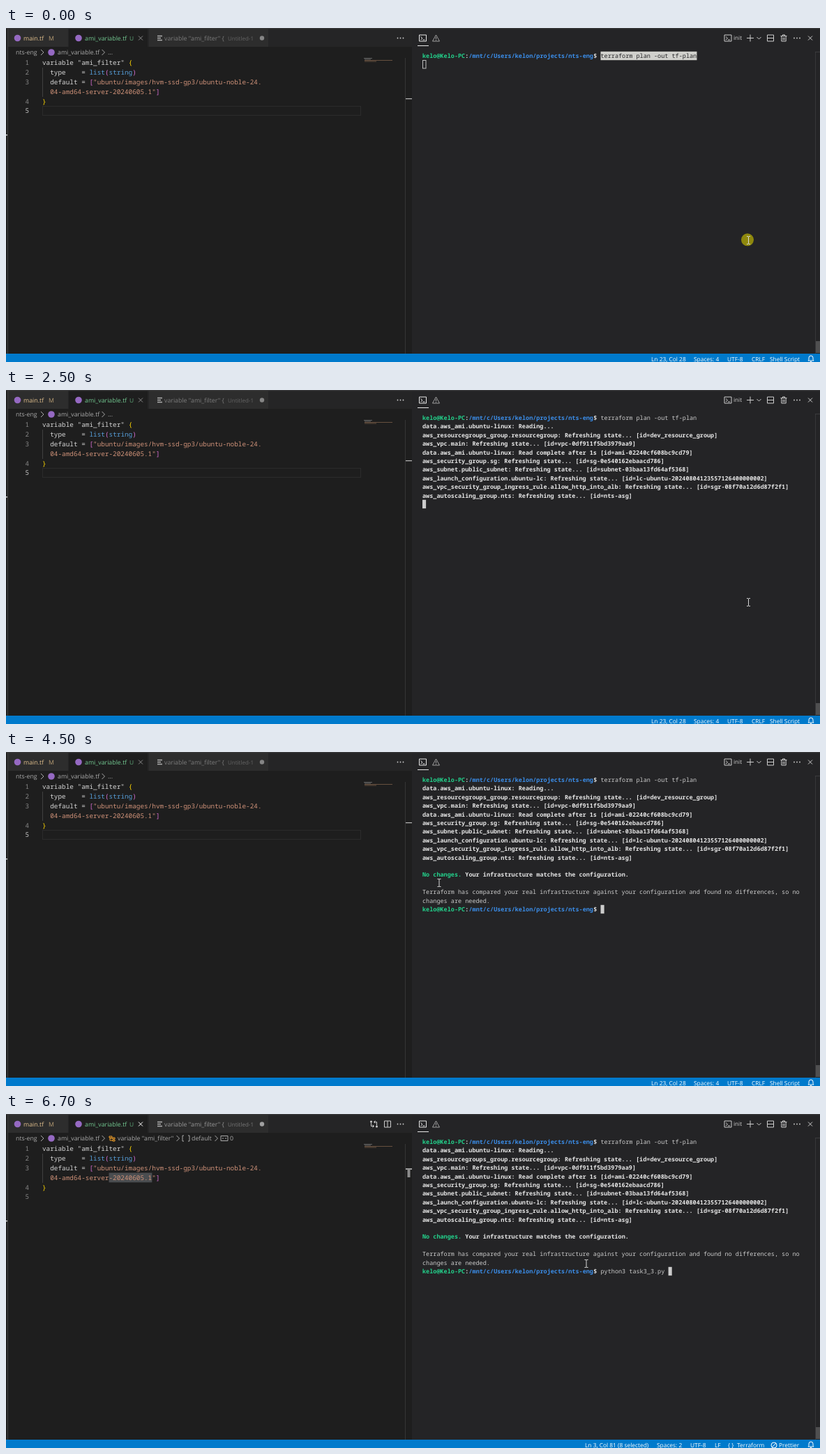
These frames come from a looping animation (1167 px wide and 480 px high, 8000 ms). An HTML page with a canvas:

```html
<!DOCTYPE html>
<html lang="en">
<head>
<meta charset="utf-8">
<title>Editor and terminal</title>
<style>
html, body { margin: 0; width: 100%; height: 100%; overflow: hidden; background: #1e1e1e; }
canvas { display: block; }
</style>
</head>
<body>
<canvas id="stage" width="1167" height="480"></canvas>
<script>
const ctx = document.getElementById('stage').getContext('2d');
const LOOP = 8000;
const WHITE = '#e5e5e5', GREY = '#cccccc', GREEN = '#23d18b', BLUE = '#3b8eea', DIM = '#a9a9a9';
const YELLOW = '#ffd700', PINK = '#da70d6', KEYWORD = '#569cd6', STRING = '#ce9178', PURPLE = '#9569c2';
const MONO = '"Noto Sans Mono", monospace';
const CODE = '9.367px ' + MONO, TERM = '8.517px ' + MONO, BOLD = 'bold ' + TERM;
const ui = size => size + 'px "Open Sans", sans-serif';
const COL = 5.11, ROW = 12.4, TERM_X = 597, TERM_Y = 33.8;
const CODE_COL = 5.62, CODE_X = 52;

const PROMPT = ['kelo@Kelo-PC', GREEN, ':', WHITE, '/mnt/c/Users/kelon/projects/nts-eng', BLUE, '$ ', WHITE];
const PROMPT_COLS = 50;
const PLAN = 'terraform plan -out tf-plan';
const TYPED = 'python3 task3_3.py ';
const OUTPUT = `data.aws_ami.ubuntu-linux: Reading...
aws_resourcegroups_group.resourcegroup: Refreshing state... [id=dev_resource_group]
aws_vpc.main: Refreshing state... [id=vpc-0df911f5bd3979aa9]
data.aws_ami.ubuntu-linux: Read complete after 1s [id=ami-02240cf608bc9cd79]
aws_security_group.sg: Refreshing state... [id=sg-0e540162ebaacd786]
aws_subnet.public_subnet: Refreshing state... [id=subnet-03baa13fd64af5368]
aws_launch_configuration.ubuntu-lc: Refreshing state... [id=lc-ubuntu-20240804123557126400000002]
aws_vpc_security_group_ingress_rule.allow_http_into_alb: Refreshing state... [id=sgr-08f70a12d6d87f2f1]
aws_autoscaling_group.nts: Refreshing state... [id=nts-asg]`.split('\n');
const SUMMARY = ['Terraform has compared your real infrastructure against your configuration and found no differences, so no',
  'changes are needed.'];

// Step tables: [time, values...]
const ROWS = [[0, 1], [2000, 5], [2500, 10], [3000, 15]];
const KEYS = [[0, 0], [5000, 1], [5500, 2], [6000, 3], [6050, 4], [6100, 6], [6150, 7],
  [6250, 8], [6300, 9], [6350, 12], [6400, 19]];
const MOUSE = [[0, 1064.5, 305, 1], [500, 1064.5, 305, 0], [3500, 601, 198, 1], [4000, 694, 215, 1],
  [4500, 621, 188, 0], [6450, 420, 140, 0], [6500, 210, 92, 1], [6550, 180, 92, 1],
  [6600, 148, 92, 1], [6650, 500, 150, 0], [6700, 832, 215, 0]];
const SELECTED = [[0, 0], [6550, 5], [6600, 11]];
const at = (table, t) => table.filter(step => step[0] <= t).pop().slice(1);

function box(x, y, w, h, color) {
  ctx.fillStyle = color;
  ctx.fillRect(x, y, w, h);
}
function frame(x, y, w, h, color) {
  ctx.strokeStyle = color;
  ctx.lineWidth = 1;
  ctx.strokeRect(x, y, w, h);
}
function disc(x, y, r, color) {
  ctx.fillStyle = color;
  ctx.beginPath();
  ctx.arc(x, y, r, 0, 7);
  ctx.fill();
}
function stroke(path, x, y, color, width = 1) {
  ctx.save();
  ctx.translate(x, y);
  ctx.strokeStyle = color;
  ctx.lineWidth = width;
  ctx.stroke(new Path2D(path));
  ctx.restore();
}
function text(str, x, y, color, font = ui(8.8)) {
  ctx.font = font;
  ctx.fillStyle = color;
  ctx.fillText(str, x, y);
}
// Alternating strings and colours on one monospaced line
function run(parts, x, y, font, advance) {
  for (let i = 0; i < parts.length; i += 2) {
    text(parts[i], x, y, parts[i + 1], font);
    x += parts[i].length * advance;
  }
}
const chevron = (x, y, color) => stroke('M-2 -4L2 0L-2 4', x, y, color);
const cross = (x, y, color) => stroke('M-3 -3L3 3M3 -3L-3 3', x, y, color);
const dots = (x, y) => [-4, 0, 4].forEach(d => disc(x + d, y, 0.9, GREY));
const prompt = (x, y, color) => stroke('M-5 -4.5H5V4.5H-5ZM-3 -2L-.5 .3L-3 2.5M0 2.5H3', x, y, color);

function drawTabs(focused) {
  box(3, 1, 579, 26, '#252526');
  box(3, 1, 86, 26, '#2d2d2d');
  box(90, 1, 113, 26, '#1e1e1e');
  box(205, 1, 171, 26, '#2d2d2d');
  disc(16.5, 14.5, 4.8, PURPLE);
  text('main.tf', 25, 18, '#e2c08d');
  text('M', 61, 18, '#b79c73');
  disc(104, 14.5, 4.8, PURPLE);
  text('ami_variable.tf', 113, 18, '#73c991');
  text('U', 177, 18, '#5ea577', ui(8.4));
  cross(193, 14.5, focused ? '#ffffff' : '#8a8a8a');
  stroke('M0 0H7M0 3H5M0 6H7', 217, 11.5, '#b0b0b0', 1.3);
  text('variable "ami_filter" {', 227, 18, focused ? '#969696' : '#7c7c7c');
  text('Untitled-1', 318, 18, focused ? '#777777' : '#646464', ui(8));
  disc(367, 14.5, 3.2, focused ? '#a0a0a0' : '#858585');
  dots(565.5, 14.5);
  if (focused) {
    stroke('M-4 -2V3H0M-2 1L0 3L-2 5M4 2V-3H0M2 -5L0 -3L2 -1', 527.5, 14.5, GREY);
    disc(523.5, 11, 1.5, GREY);
    disc(531.5, 18, 1.5, GREY);
    stroke('M-4.5 -4.5H4.5V4.5H-4.5ZM0 -4.5V4.5', 547, 14.5, GREY);
  }
}

function drawBreadcrumbs(focused) {
  text('nts-eng', 14, 38, DIM);
  chevron(52, 35, DIM);
  disc(65, 35, 4.8, PURPLE);
  text('ami_variable.tf', 74, 38, DIM);
  chevron(139.5, 35, DIM);
  if (!focused) return text('...', 146, 38, DIM);
  stroke('M-4 -3H0V-1H-4ZM-3 -1V3H1M-3 0H1M1 -1H4V1H1ZM1 2H4V4H1Z', 152, 35, '#ee9d28');
  text('variable "ami_filter"', 160, 38, DIM);
  chevron(246.5, 35, DIM);
  stroke('M-3 -4H-5V4H-3M3 -4H5V4H3', 258, 35, DIM);
  text('default', 266, 38, DIM);
  chevron(301.5, 35, DIM);
  stroke('M-5 -3.5H5V3.5H-5ZM-3 0H-1M1 0H3', 313, 35, DIM);
  text('0', 321, 38, DIM);
}

function drawEditor(t) {
  const focused = t >= 6500;
  const [selected] = at(SELECTED, t);
  box(0, 0, 582, 468, '#1e1e1e');
  drawTabs(focused);
  drawBreadcrumbs(focused);
  const baseline = row => 53.2 + row * 13.83;
  if (!focused) frame(CODE_X + 0.5, 112.5, 456, 13, '#2b2b2b');
  box(CODE_X, 57, 1, 42, '#404040');
  const end = CODE_X + 28 * CODE_COL;
  box(end - selected * CODE_COL, 84.5, selected * CODE_COL, 13.8, '#4a4d50');
  [0, 1, 2, 4, 5].forEach((row, i) =>
    text(i + 1, 27.4, baseline(row), row === 5 && !focused ? '#c6c6c6' : '#858585', CODE));
  [
    ['variable "ami_filter" ', '#d4d4d4', '{', YELLOW],
    ['  type    = ', '#d4d4d4', 'list', KEYWORD, '(', PINK, 'string', KEYWORD, ')', PINK],
    ['  default = ', '#d4d4d4', '[', PINK, '"ubuntu/images/hvm-ssd-gp3/ubuntu-noble-24.', STRING],
    ['  04-amd64-server-20240605.1"', STRING, ']', PINK],
    ['}', YELLOW]
  ].forEach((parts, row) => run(parts, CODE_X, baseline(row), CODE, CODE_COL));

  // Minimap and overview ruler
  [[513, 43, 12], [514, 44.5, 9], [514, 46, 40], [514, 47.5, 17]].forEach(([x, y, w], i) =>
    box(x, y, w, 1, i < 2 ? '#626262' : '#67503f'));
  box(572, 43, 1, 425, '#343434');
  if (focused) {
    box(573, 78, 9, 2, '#a0a0a0');
    box(575.5, 79, 4, 12, '#8c8c8c');
  } else {
    box(573, 101, 9, 1.3, '#b0b0b0');
  }
  box(2, 0, 1, 468, '#3f3f3f');
  box(0, 153, 2, 1.5, GREY);
}

function drawPanelHeader() {
  prompt(597.5, 14.5, '#e7e7e7');
  box(590, 25, 16, 1, '#e7e7e7');
  stroke('M0 -4.5L5 4.5H-5ZM0 -1.5V1.5M0 2.3V3.5', 616.5, 14.5, '#a0a0a0');
  prompt(1035, 14.5, GREY);
  text('init', 1043, 17, GREY, ui(8.2));
  stroke('M-5 0H5M0 -5V5', 1067, 14.5, GREY);
  stroke('M-3 -1.5L0 1.5L3 -1.5', 1079.5, 14.5, GREY);
  stroke('M-4.5 -4.5H4.5V4.5H-4.5ZM-4.5 0H4.5', 1096, 14.5, GREY);
  stroke('M-4.5 -3H4.5M-1.5 -3V-4.7H1.5V-3M-3.2 -3V4.5H3.2V-3M-1 -1V3M1 -1V3', 1115, 14.5, GREY);
  dots(1134, 14.5);
  cross(1153, 14.5, GREY);
}

function drawTerminal(t) {
  const [rows] = at(ROWS, t);
  const [keys] = at(KEYS, t);
  const done = rows === 15;
  const top = row => TERM_Y + row * ROW;
  const line = (row, parts, font, col = 0) =>
    run(parts, TERM_X + col * COL, top(row) + 9.2, font, COL);
  const highlight = (row, col, cols) =>
    box(TERM_X + col * COL, top(row), cols * COL, ROW, '#d0d0cc');

  box(582, 0, 585, 468, '#242426');
  drawPanelHeader();
  box(1160, 34, 1, 434, '#363638');
  box(1160, 34, 7, 1, '#3c3c3e');
  box(1161, 450, 6, 17, '#4f4f50');

  const planSelected = t < 1000;
  if (planSelected) highlight(0, PROMPT_COLS, PLAN.length);
  line(0, PROMPT, BOLD);
  line(0, [PLAN, planSelected ? '#242426' : GREY], TERM, PROMPT_COLS);
  OUTPUT.slice(0, rows - 1).forEach((str, i) => line(i + 1, [str, WHITE], BOLD));

  if (done) {
    const dragging = t >= 4000 && t < 4500;
    if (dragging) {
      highlight(13, 0, 110);
      highlight(14, 0, SUMMARY[1].length);
    }
    line(11, ['No changes.', GREEN, ' Your infrastructure matches the configuration.', WHITE], BOLD);
    SUMMARY.forEach((str, i) => line(13 + i, [str, dragging ? '#242426' : GREY], TERM));
    line(15, PROMPT, BOLD);
    line(15, [TYPED.slice(0, keys), GREY], TERM, PROMPT_COLS);
  }

  const x = TERM_X + (done ? PROMPT_COLS + keys : 0) * COL;
  const blurred = t < 500 || (t >= 6500 && t < 6700);
  if (blurred) frame(x + 0.5, Math.round(top(rows)) + 0.5, 4.5, 11.5, '#bdbdbd');
  else box(x, top(rows), COL, ROW, GREY);
}

function drawStatus(focused) {
  box(0, 468, 1167, 12, '#007acc');
  const items = focused
    ? ['Ln 3, Col 81 (8 selected)', 830, 'Spaces: 2', 933, 'UTF-8', 981, 'LF', 1016,
      '{ }', 1035, 'Terraform', 1048, 'Prettier', 1108]
    : ['Ln 23, Col 28', 925, 'Spaces: 4', 986, 'UTF-8', 1034, 'CRLF', 1069, 'Shell Script', 1095];
  for (let i = 0; i < items.length; i += 2) text(items[i], items[i + 1], 479, '#ffffff', ui(8.4));
  if (focused) stroke('M4 0A4 4 0 1 1 -4 0A4 4 0 1 1 4 0M-3 3L3 -3', 1101, 476, '#ffffff');
  stroke('M-4 2.5H4L3 1V-1.5A3 3 0 0 0 -3 -1.5V1ZM-1 4H1', 1154, 475.5, '#ffffff');
}

function drawMouse(t) {
  const [x, y, pressed] = at(MOUSE, t);
  if (pressed) disc(x - 1.5, y - 0.7, 9, 'rgba(200, 190, 0, .65)');
  stroke('M-2.5 -5.5H-.7L0 -5L.7 -5.5H2.5M0 -5V5M-2.5 5.5H-.7L0 5L.7 5.5H2.5', x, y, '#d8d8d8');
}

function draw(now) {
  const t = now % LOOP;
  ctx.textRendering = 'geometricPrecision';
  drawEditor(t);
  drawTerminal(t);
  box(0, 0, 1167, 1.3, '#39393b');
  drawStatus(t >= 6500);
  drawMouse(t);
  requestAnimationFrame(() => draw(performance.now()));
}
draw(0);
</script>
</body>
</html>
```
